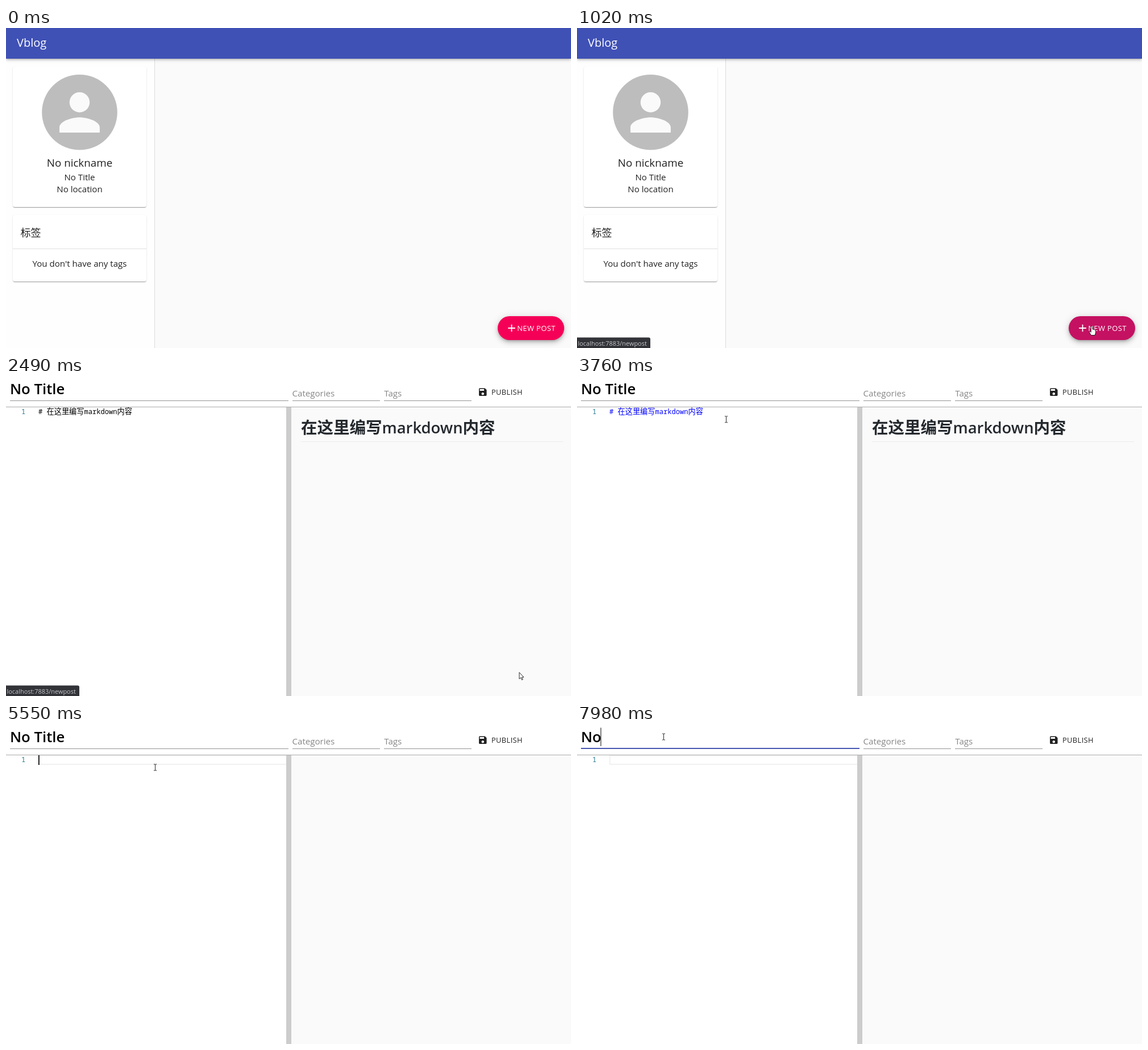
Animation, 994 px wide and 563 px high, one loop 8 s. Source, as an HTML page:

```html
<!DOCTYPE html>
<html lang="zh">
<head>
<meta charset="utf-8">
<title>Blog editor</title>
<style>
html, body { margin: 0; width: 100%; height: 100%; overflow: hidden; background: #fff; }
#stage, .page, svg { position: absolute; left: 0; top: 0; width: 994px; height: 563px; overflow: hidden; }
.box { position: absolute; box-sizing: border-box; }
.card { left: 12px; width: 235px; background: #fff; border-radius: 3.5px;
  box-shadow: 0 1.7px .9px -.8px rgba(0,0,0,.2), 0 .9px .9px rgba(0,0,0,.14), 0 .9px 2.5px rgba(0,0,0,.12); }
#bar { left: 0; top: 0; width: 994px; height: 54px; background: #3f51b5;
  box-shadow: 0 1.7px 3.4px -.8px rgba(0,0,0,.2), 0 3.4px 4.2px rgba(0,0,0,.14), 0 .8px 8.4px rgba(0,0,0,.12); }
#side { left: 0; top: 54px; width: 262px; height: 509px; background: #fefefe; border-right: 1px solid #dcdcdc; }
#button { left: 865px; top: 507px; width: 117px; height: 42px; border-radius: 21px; overflow: hidden; }
#ripple { left: -39px; top: -63px; width: 160px; height: 160px; border-radius: 50%; background: #fff; }
text { font: 15.1px "Open Sans", "Noto Sans", sans-serif; fill: #212121; white-space: pre; }
.mid { text-anchor: middle; }
.cjk { font-family: "Noto Sans CJK SC", "Noto Sans CJK", sans-serif; }
.code { font: 12.1px "Noto Sans Mono", "DejaVu Sans Mono", monospace; }
.code .cjk { font-size: 13.2px; }
.head { font-size: 27.4px; font-weight: 600; fill: #24292e; }
.head .cjk { font-size: 28.5px; }
.hint { fill: #868686; }
#title { font-size: 25.7px; font-weight: 600; fill: #000; }
</style>
</head>
<body>
<div id="stage">
  <div class="page" id="home" style="background:#fafafa">
    <div class="box" id="side"></div>
    <div class="box" id="bar"></div>
    <div class="box card" style="top:68px;height:247px"></div>
    <div class="box card" style="top:329px;height:117px"></div>
    <div class="box" id="button"><div class="box" id="ripple"></div></div>
    <svg>
      <text x="19" y="33" style="font-size:20px;fill:#fff">Vblog</text>
      <circle cx="129.5" cy="148.3" r="66.3" fill="#bdbdbd"/>
      <path transform="translate(76.3 95.3) scale(4.43)" fill="#fafafa" d="M12 12a4 4 0 1 0 0-8a4 4 0 0 0 0 8zm0 2c-2.67 0-8 1.34-8 4v2h16v-2c0-2.66-5.33-4-8-4z"/>
      <text class="mid" x="129.5" y="243.5" style="font-size:18.8px">No nickname</text>
      <text class="mid" x="129.5" y="267.5">No Title</text>
      <text class="mid" x="129.5" y="288.5">No location</text>
      <text class="cjk" x="25.5" y="367" style="font-size:18px">标签</text>
      <path d="M12 388.5H247" stroke="#e0e0e0"/>
      <text class="mid" x="129.5" y="419.5">You don't have any tags</text>
      <path d="M883.2 528h12.6M889.5 521.7v12.6" stroke="#fff" stroke-width="1.8"/>
      <text x="899.2" y="532.7" style="font-size:13px;font-weight:500;letter-spacing:.35px;fill:#fff">NEW POST</text>
    </svg>
  </div>
  <div class="page" id="editor" style="background:#fff">
    <svg>
      <rect x="502" y="54" width="492" height="509" fill="#fafafa"/>
      <path d="M7 43.5H497M504 43.5H658M665 43.5H819" stroke="#949494"/>
      <rect id="hover" x="7" y="42" width="490" height="1.8" fill="#212121"/>
      <rect id="focus" y="42" height="1.8" fill="#3f51b5"/>
      <text id="title" x="7" y="32"></text>
      <rect id="titleCaret" y="6.5" width="1" height="32.5"/>
      <text class="hint" x="503.5" y="35.5">Categories</text>
      <text class="hint" x="665.3" y="35.5">Tags</text>
      <path transform="translate(829.8 19.2) scale(.75)" fill="#212121" d="M17 3H5c-1.11 0-2 .9-2 2v14c0 1.1.89 2 2 2h14c1.1 0 2-.9 2-2V7l-4-4zm-5 16c-1.66 0-3-1.34-3-3s1.34-3 3-3 3 1.34 3 3-1.34 3-3 3zm3-10H5V5h10v4z"/>
      <text x="854" y="33" style="font-size:12.9px;letter-spacing:.36px">PUBLISH</text>
      <rect id="line" x="57.8" y="55.4" width="440" height="15.4" fill="none" stroke="#eee" stroke-width="1.7"/>
      <rect id="word" x="71.5" y="55" width="150.5" height="17" fill="#d5d5d5"/>
      <rect id="selection" x="57" y="55" width="165" height="17" fill="#add6ff"/>
      <text class="code" x="27" y="66.5" style="fill:#237893">1</text>
      <text class="code" id="code" x="57" y="66.5"># <tspan class="cjk">在这里编写</tspan>markdown<tspan class="cjk">内容</tspan></text>
      <rect id="codeCaret" y="54.5" width="1.7" height="17.5"/>
      <rect x="493" y="54" width="9" height="509" fill="#ccc"/>
      <path d="M0 54.5H994" stroke="#ababab"/>
      <g id="preview">
        <text class="head" x="519" y="101"><tspan class="cjk">在这里编写</tspan>markdown<tspan class="cjk">内容</tspan></text>
        <path d="M519 115.5H980" stroke="#eaecef"/>
      </g>
    </svg>
  </div>
  <svg>
    <g id="status">
      <path d="M0 544.5H126q3 0 3 3V563H0z" fill="#323338"/>
      <text x="1.5" y="558.7" style="font-size:10.95px;fill:#c6c8cc">localhost:7883/newpost</text>
    </g>
    <g id="cursor" fill="#fff" stroke="#111" stroke-width=".9" stroke-linejoin="round">
      <path id="arrow" d="M0 0V11.5L2.7 9.1 4.5 13.2 6.3 12.4 4.5 8.5H8Z"/>
      <path id="hand" d="M-1.3.8Q0-.8 1.3.8V5.5Q2.6 4.8 3.4 6Q4.8 5.6 5.3 6.8Q7 6.6 7 8.4V11.5L5.6 16H-1L-4.2 10.8Q-4.6 9-3 9.3L-1.3 10.8Z"/>
      <path id="beam" fill="none" d="M-2.5-5.5h2l.5.5.5-.5h2M0-5V5M-2.5 5.5h2l.5-.5.5.5h2"/>
    </g>
  </svg>
</div>
<script>
const LOOP = 8000, OPEN = 2490, CLEAR = 5550, PRESS = 1440, FOCUS = 6510;
const ui = {};
for (const el of document.querySelectorAll('[id]')) ui[el.id] = el;

// Pointer stops: time, x, y
const stops = [
  [70, 579, 397], [860, 905.5, 524.5], [2250, 905.5, 524.5], [2330, 904, 522.5],
  [2490, 903, 521.5], [2920, 903, 521.5], [3600, 262.5, 76.3],
  [5950, 262.5, 76.3], [6400, 152.5, 22.5], [LOOP, 152.5, 22.5]
];
const deletions = [7280, 7360, 7510, 7670, 7820, 7980];

const show = (el, on) => { el.style.display = on ? '' : 'none'; };
const within = (t, a, b) => t >= a && t < b;
const ramp = (t, start, length) => Math.min(1, Math.max(0, (t - start) / length));
const smooth = p => p * p * (3 - 2 * p);
const mix = (a, b, p) => a + (b - a) * p;

function pointer(t) {
  const i = Math.max(1, stops.findIndex(s => s[0] > t));
  const [t0, x0, y0] = stops[i - 1], [t1, x1, y1] = stops[i];
  const p = smooth(ramp(t, t0, t1 - t0));
  return [mix(x0, x1, p), mix(y0, y1, p)];
}

function drawCursor(t) {
  const [x, y] = pointer(t);
  const hand = t < OPEN && x > 865 && y > 507;
  const beam = t >= OPEN && x < 493 && (y > 55 || y < 44);
  show(ui.cursor, t >= 70);
  show(ui.hand, hand);
  show(ui.beam, beam);
  show(ui.arrow, !hand && !beam);
  ui.cursor.setAttribute('transform', `translate(${x} ${y})`);
}

function drawButton(t) {
  const h = smooth(ramp(t, 650, 210));
  const lift = t >= 2330 ? 1.5 : 1;
  const shadow = (y, blur, spread, alpha) =>
    `0 ${y * lift}px ${blur * lift}px ${spread}px rgba(0,0,0,${alpha})`;
  ui.button.style.background = `rgb(${mix(245, 197, h)},${mix(0, 17, h)},${mix(87, 98, h)})`;
  ui.button.style.boxShadow =
    [shadow(2.5, 4.2, -.8, .2), shadow(5, 8.4, 0, .14), shadow(.8, 15, 0, .12)].join();
  const p = smooth(ramp(t, PRESS, 510));
  ui.ripple.style.transform = `scale(${p})`;
  ui.ripple.style.opacity = mix(.1, .3, p);
}

function drawEditor(t) {
  show(ui.code, t < CLEAR);
  show(ui.preview, t < CLEAR);
  ui.code.style.fill = t < 2650 ? '#000' : '#00f';
  show(ui.line, t >= 4230);
  show(ui.word, within(t, 4530, 4770));
  show(ui.selection, within(t, 4770, CLEAR));
  show(ui.codeCaret, within(t, 4230, 4730) || within(t, 4770, 5240) || within(t, CLEAR, 6010));
  ui.codeCaret.setAttribute('x', t < CLEAR ? 221.8 : 57);

  const gone = deletions.filter(d => t >= d).length;
  ui.title.textContent = 'No Title'.slice(0, 8 - gone);
  ui.titleCaret.setAttribute('x', Math.round(6.6 + ui.title.getComputedTextLength()) - .5);
  show(ui.titleCaret, within(t, FOCUS, 7040) || t >= 7590);
  show(ui.hover, within(t, 6290, FOCUS + 200));
  const w = 490 * smooth(ramp(t, FOCUS, 200));
  ui.focus.setAttribute('x', 252 - w / 2);
  ui.focus.setAttribute('width', w);
}

function draw() {
  const t = performance.now() % LOOP;
  show(ui.home, t < OPEN);
  show(ui.editor, t >= OPEN);
  if (t < OPEN) drawButton(t); else drawEditor(t);
  ui.status.style.opacity = t < 2810 ? ramp(t, 900, 110) : 0;
  drawCursor(t);
  requestAnimationFrame(draw);
}
draw();
</script>
</body>
</html>
```
